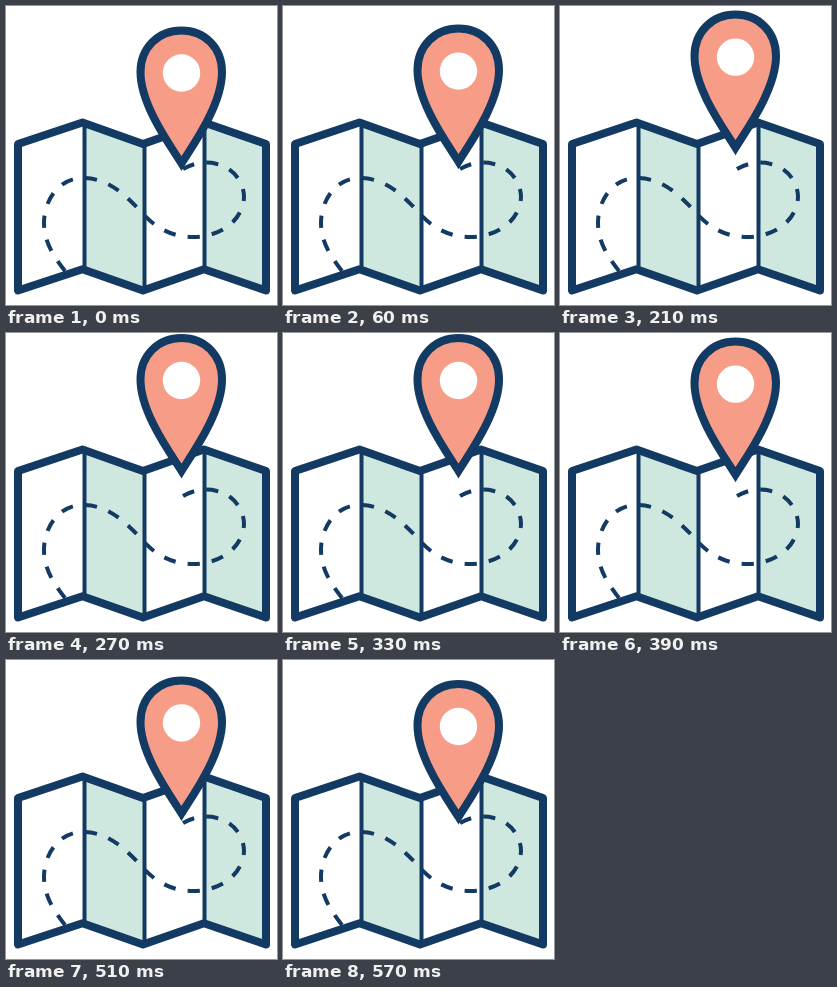
These frames come from a looping animation (271 px wide and 299 px high, 0.6 s). An HTML page:

```html
<!DOCTYPE html>
<html lang="en">
<head>
<meta charset="utf-8">
<title>Map pin</title>
<style>
  html, body { margin: 0; width: 100%; height: 100%; overflow: hidden; background: #fff; }
  svg { display: block; width: 100vw; height: 100vh; }
  .line { fill: none; stroke: #123a63; stroke-width: 8; stroke-linejoin: round; }
  .fold { stroke-width: 4; }
  .route { stroke-width: 4; stroke-dasharray: 1 1; }
  .shade { fill: #cfe8df; }
  .pin { fill: #f79d87; stroke-linejoin: miter; }
</style>
</head>
<body>
<svg viewBox="0 0 271 299">
  <path class="shade" d="M78 117 138 138V284L78 263ZM198.500 117 260 138V284L198.500 263Z"/>
  <path class="line fold" d="M78.500 117V263M138.500 138V284M198.500 117V263"/>
  <!-- 17 dashes with 16 equal gaps -->
  <path class="line route" pathLength="33" d="M177 163C187 157 200 155 211 158C228 162 238 177 238 191C237 215 214 231 187 231C166 231 150 222 137 208C120 189 102 172 77 172C53 172 38 194 38 217C38 235 47 250 59 265"/>
  <path class="line" d="M12 138 76.500 116.500 137 138 198 116.500 260 138V284.500L198 263.200 137 284.500 76.500 263.200 12 284.500Z"/>
  <g id="pin">
    <path class="line pin" d="M175.500 157.500C164 139 134.500 99 134.500 66C134.500 42 152 24.500 175.500 24.500S216 42 216 66C216 99 187 139 175.500 157.500Z"/>
    <circle cx="175.500" cy="67" r="18.700" fill="#fff"/>
  </g>
</svg>
<script>
  const LOOP = 600, STEP = 30, LIFT = 20;
  const pin = document.getElementById('pin');
  const start = performance.now();

  function draw(now) {
    const t = Math.floor(Math.max(0, now - start) % LOOP / STEP) * STEP;
    const y = -LIFT / 2 * (1 - Math.cos(2 * Math.PI * t / LOOP));
    pin.setAttribute('transform', `translate(0 ${y.toFixed(2)})`);
    requestAnimationFrame(draw);
  }
  draw(start);
</script>
</body>
</html>
```
